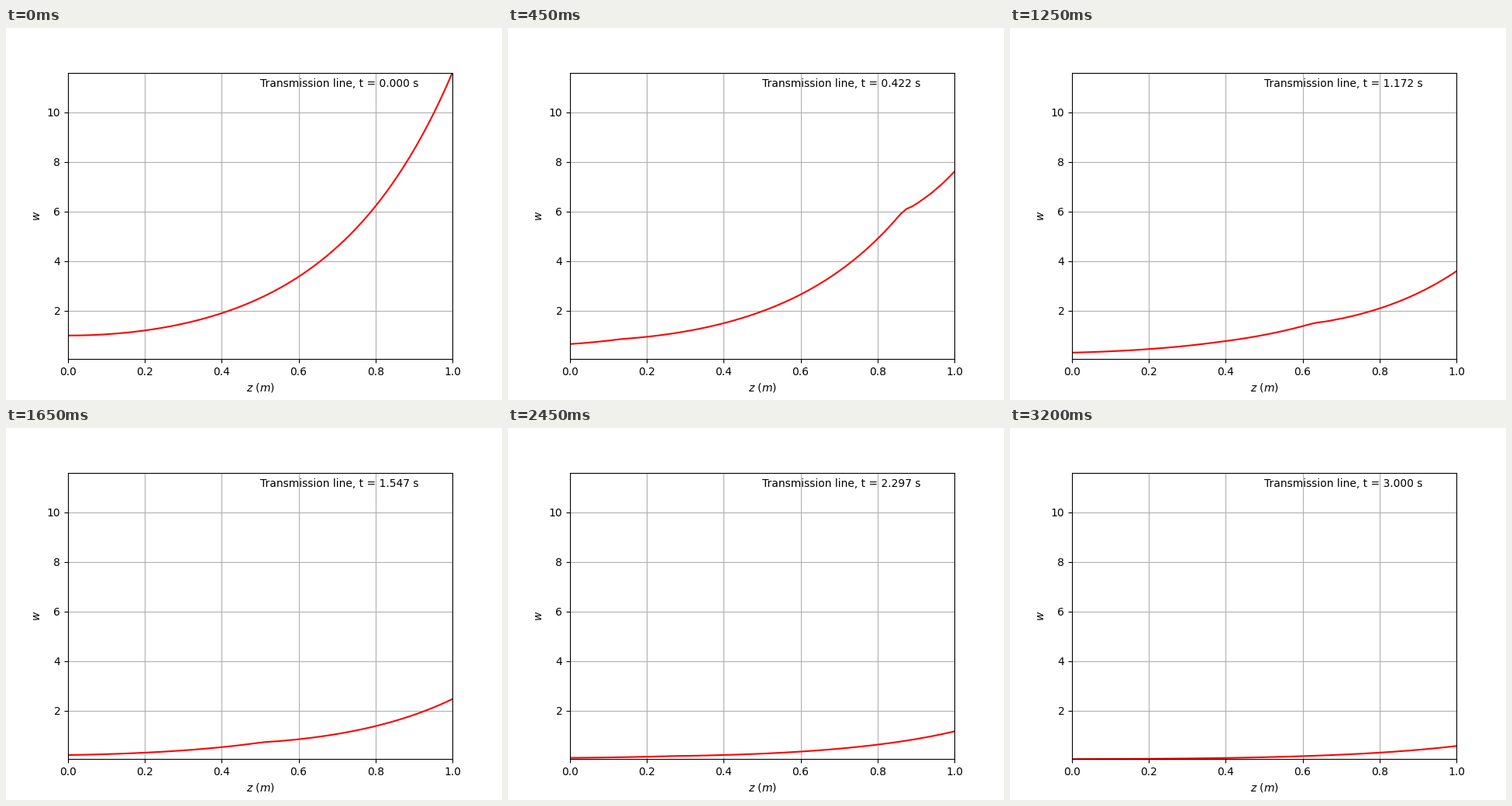
A matplotlib script that plays this animation: 640x480 px, repeating every 3.25 s.

```python
import numpy as np
import matplotlib.pyplot as plt
from matplotlib.animation import FuncAnimation

STEPS = 64
CELLS = 64
T_END = 3.0

dt = T_END / STEPS
dz = 1 / CELLS
z = np.linspace(0, 1, CELLS + 1)
t = np.linspace(0, T_END, STEPS + 1)


def solve():
    """Leapfrog for w_tt + 4 w_t + 4 w = w_zz / pi^2 with driven ends."""
    w = np.zeros((STEPS + 1, CELLS + 1))
    w[0] = np.cosh(np.pi * z)
    w[1] = w[0] * (1 - dz)
    w[:, 0] = np.exp(-t)
    w[:, -1] = np.exp(-t) * np.cosh(np.pi)
    r2 = (dt / (np.pi * dz)) ** 2
    for n in range(1, STEPS):
        now, old = w[n], w[n - 1]
        bend = now[2:] - 2 * now[1:-1] + now[:-2]
        w[n + 1, 1:-1] = (
            (2 - 4 * dt**2) * now[1:-1] - (1 - 2 * dt) * old[1:-1] + r2 * bend
        ) / (1 + 2 * dt)
    return w


w = solve()

fig, ax = plt.subplots(figsize=(6.4, 4.8), dpi=100)
ax.set_xlim(0, 1)
ax.set_ylim(w.min(), w.max())
ax.set_xlabel(r"$z\ (m)$")
ax.set_ylabel(r"$w$")
ax.grid(True)
line, = ax.plot(z, w[0], "r", lw=1.5)
label = ax.text(0.5, 0.95, "", transform=ax.transAxes)


def update(i):
    line.set_ydata(w[i])
    label.set_text(f"Transmission line, t = {t[i]:.3f} s")
    return line, label


anim = FuncAnimation(fig, update, frames=STEPS + 1, interval=50,
                     repeat=True, repeat_delay=0)
plt.show()
```
